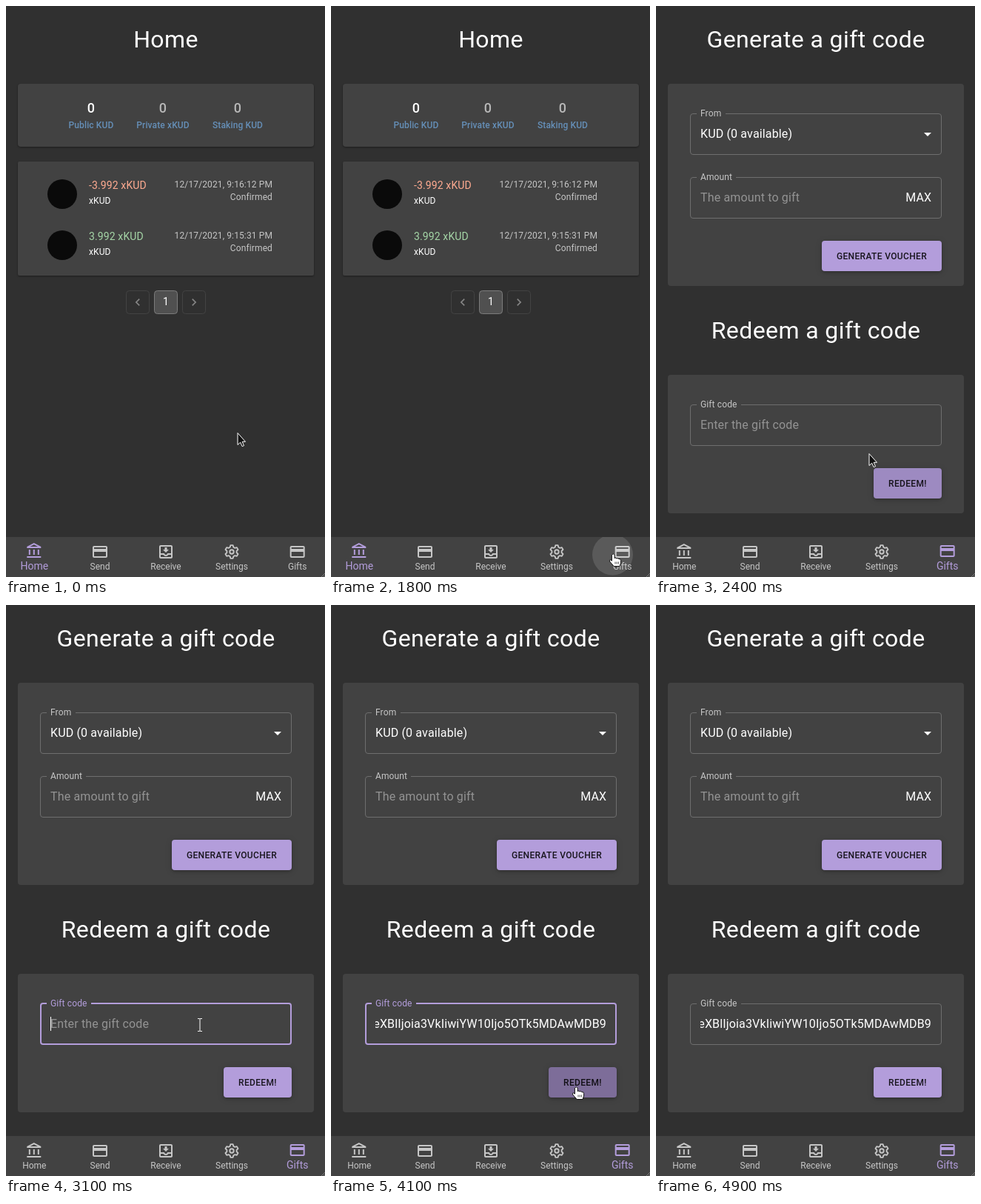
Write an HTML page that moves like this. It is 431 px wide and 771 px high and loops after 8000 ms.

```html
<!DOCTYPE html>
<html lang="en">
<head>
<meta charset="utf-8">
<title>Wallet gift code</title>
<style>
html, body { margin: 0; height: 100%; overflow: hidden; background: #303030; }
svg { display: block; width: 100vw; height: 100vh; font-family: Roboto, sans-serif; }
.card { filter: drop-shadow(0 1px 1px rgba(0, 0, 0, .4)); }
.button { filter: drop-shadow(0 2px 2px rgba(0, 0, 0, .2)) drop-shadow(0 1px 4px rgba(0, 0, 0, .12)); }
</style>
</head>
<body>
<svg id="stage" viewBox="0 0 431 771"></svg>
<script>
const LOOP = 8000, STEP = 100;
const PURPLE = '#b39ddb', PURPLE_DARK = '#7d6d99', SOFT = '#c6c6c6', PANEL = '#424242', LINE = '#6e6e6e';
const GIFT_CODE = 'eyJ0eXBlIjoia3VkIiwiYW10Ijo5OTk5MDAwMDB9';

// Linear interpolation through [time, ...values] keys
function track(t, keys) {
  const next = keys.findIndex(key => key[0] > t);
  if (next === 0) return keys[0].slice(1);
  if (next < 0) return keys[keys.length - 1].slice(1);
  const a = keys[next - 1], b = keys[next], k = (t - a[0]) / (b[0] - a[0]);
  return a.slice(1).map((v, i) => v + (b[i + 1] - v) * k);
}
const mix = (from, to, k) => `color-mix(in srgb, ${to} ${k * 100}%, ${from})`;

function text(x, y, str, size, fill = '#fff', { anchor = 'start', weight = 400, spacing = .12, extra = '' } = {}) {
  return `<text x="${x}" y="${y}" font-size="${size}" fill="${fill}" text-anchor="${anchor}"
    font-weight="${weight}" letter-spacing="${spacing}" ${extra}>${str}</text>`;
}
const rect = (x, y, w, h, r, fill, extra = '') =>
  `<rect x="${x}" y="${y}" width="${w}" height="${h}" rx="${r}" fill="${fill}" ${extra}/>`;
const icon = (x, y, size, d, fill) =>
  `<path transform="translate(${x} ${y}) scale(${size / 24})" d="${d}" fill="${fill}"/>`;
const title = (y, str) => text(216, y, str, 32, '#fff', { anchor: 'middle', spacing: .4 });

// Home page

function balance(x, label, fill) {
  const opts = { anchor: 'middle', weight: 500 };
  return text(x, 144, '0', 18, fill, opts) + text(x, 165, label, 12, '#658fb8', opts);
}

function transaction(y, amount, fill, date) {
  const end = { anchor: 'end' };
  return `<circle cx="76" cy="${y}" r="20" fill="#0a0a0a"/>`
    + text(112, y - 7, amount, 14, fill) + text(112, y + 13, 'xKUD', 12)
    + text(360, y - 9, date, 12, SOFT, end) + text(360, y + 8, 'Confirmed', 12, SOFT, end);
}

function pageButton(x, fill, stroke) {
  return rect(x + .5, 384.5, 31, 31, 4, fill, `stroke="${stroke}"`);
}

const homePage = title(56, 'Home')
  + rect(16, 105, 400, 85, 4, PANEL, 'class="card"')
  + balance(115, 'Public KUD', '#fff') + balance(212, 'Private xKUD', '#b8b8b8') + balance(313, 'Staking KUD', '#b8b8b8')
  + rect(16, 210, 400, 154, 2, PANEL, 'class="card"')
  + transaction(254, '-3.992 xKUD', '#ffab91', '12/17/2021, 9:16:12 PM')
  + transaction(323, '3.992 xKUD', '#a5d6a7', '12/17/2021, 9:15:31 PM')
  + pageButton(162, 'none', '#434343') + pageButton(200, '#505050', '#7c7c7c') + pageButton(238, 'none', '#434343')
  + icon(168, 390, 20, 'M15.4 7.4L14 6l-6 6 6 6 1.4-1.4L10.8 12z', '#858585')
  + icon(244, 390, 20, 'M10 6L8.6 7.4 13.2 12l-4.6 4.6L10 18l6-6z', '#858585')
  + text(216, 404, '1', 14, '#fff', { anchor: 'middle' });

// Gift page

// The top edge moves up when the outline gets thicker
function field(y, label, notchEnd, color = LINE, width = 1, labelColor = SOFT) {
  const i = width / 2, r = 4 - i, top = y + 1 - i;
  return `<path d="M${notchEnd} ${top}H382a${r} ${r} 0 0 1 ${r} ${r}V${y + 52}
    a${r} ${r} 0 0 1 ${-r} ${r}H50a${r} ${r} 0 0 1 ${-r} ${-r}V${top + r}
    a${r} ${r} 0 0 1 ${r} ${-r}H55" fill="none" stroke="${color}" stroke-width="${width}"/>`
    + text(60, y + 4, label, 12, labelColor);
}
const inputText = (y, str, fill) => text(60, y, str, 16, fill, { spacing: .15 });

function button(x, y, w, label, fill, overlay = '') {
  return rect(x, y, w, 41, 4, fill, 'class="button"') + overlay
    + text(x + w / 2, y + 25, label, 12, 'rgba(0,0,0,.87)', { anchor: 'middle', weight: 500, spacing: .34 });
}

const giftPage = title(56, 'Generate a gift code')
  + rect(16, 105, 400, 273, 4, PANEL)
  + field(145, 'From', 94) + inputText(178, 'KUD (0 available)', '#fff')
  + '<path d="M362 171h10l-5 5z" fill="#fff"/>'
  + field(231, 'Amount', 108) + inputText(264, 'The amount to gift', '#939393')
  + text(372.3, 264, 'MAX', 16, '#fff', { anchor: 'end', spacing: .15 })
  + button(224, 317, 162, 'GENERATE VOUCHER', PURPLE)
  + title(449, 'Redeem a gift code')
  + rect(16, 498, 400, 187, 4, PANEL);

function ripple(x, y, r, fullRadius, color, strength, clip) {
  const opacity = strength * (.1 + .2 * r / fullRadius);
  return `<circle cx="${x}" cy="${y}" r="${r}" fill="${color}" opacity="${opacity}" clip-path="url(#${clip})"/>`;
}

function redeemForm(t) {
  const [focus] = track(t, [[2800, 0], [3000, .8], [3100, 1], [4200, 1], [4400, 0]]);
  const hovered = t >= 2700 && t < 3400;
  const color = mix(hovered && !focus ? '#fff' : LINE, PURPLE, focus);
  let out = field(538, 'Gift code', 115, color, focus > .5 ? 2 : 1, mix(SOFT, PURPLE, focus));

  const pasted = t >= 3300;
  out += pasted
    ? text(372, 571, GIFT_CODE, 16, '#fff', { anchor: 'end', spacing: .15, extra: 'clip-path="url(#inputClip)"' })
    : inputText(571, 'Enter the gift code', '#939393');
  if (t >= 2900 && t < 3900) out += rect(pasted ? 372 : 60, 556, 1, 19, 0, '#fff');

  const [hover] = track(t, [[2100, 0], [2300, .7], [2400, .4], [2600, .4], [2700, 0],
    [3800, 0], [4100, 1], [4600, 1], [4900, 0]]);
  let press = '';
  if (t >= 4300 && t < 4900) {
    const [r] = track(t, [[4200, 0], [4300, 8], [4400, 27], [4500, 46], [4700, 62]]);
    const [fade] = track(t, [[4500, 1], [4900, 0]]);
    press = ripple(331, 651, r, 62, '#000', .87 * fade, 'redeemClip');
  }
  return out + button(294, 624, 92, 'REDEEM!', mix(PURPLE, PURPLE_DARK, hover), press);
}

// Bottom navigation

const CARD_ICON = 'M20 4H4c-1.1 0-2 .9-2 2v12c0 1.1.9 2 2 2h16c1.1 0 2-.9 2-2V6c0-1.1-.9-2-2-2zm0 14H4v-6h16v6zm0-10H4V6h16v2z';
const BANK_ICON = 'M6.5 10h-2v7h2zm6 0h-2v7h2zM21 19H2v2h19zm-2.5-9h-2v7h2zm-7-6.74L16.71 6H6.29zm0-2.26L2 6v2h19V6z';
const INBOX_ICON = 'M16 9h-2.5V6h-3v3H8l4 4zM19 3H5c-1.1 0-2 .9-2 2v14c0 1.1.9 2 2 2h14c1.1 0 2-.9 2-2V5c0-1.1-.9-2-2-2z'
  + 'm0 16H5v-3h3.6c.7 1.2 2 2 3.4 2s2.7-.8 3.4-2H19zm0-5h-5c0 1.1-.9 2-2 2s-2-.9-2-2H5V5h14z';

function gear(x, y, color) {
  const points = [];
  for (let tooth = 0; tooth < 6; tooth++)
    for (const [r, deg] of [[6.7, -20], [9, -10.5], [9, 10.5], [6.7, 20]]) {
      const a = (tooth * 60 + deg) * Math.PI / 180;
      points.push([x + r * Math.sin(a), y - r * Math.cos(a)].map(v => v.toFixed(2)));
    }
  return `<g fill="none" stroke="${color}" stroke-width="1.9" stroke-linejoin="round">
    <polygon points="${points.join(' ')}"/><circle cx="${x}" cy="${y}" r="2.7"/></g>`;
}

function navItem(x, label, path, active = 0) {
  const color = mix(SOFT, PURPLE, active);
  return (path ? icon(x - 12, 725 - active, 24, path, color) : gear(x, 737, color))
    + text(x, 761, label, 12 + 2 * active, color, { anchor: 'middle', spacing: 0 });
}

function navigation(t) {
  const [gifts] = track(t, [[1900, 0], [2200, 1]]);
  let out = rect(0, 717, 431, 54, 0, PANEL)
    + navItem(38.3, 'Home', BANK_ICON, 1 - gifts) + navItem(127, 'Send', CARD_ICON)
    + navItem(216, 'Receive', INBOX_ICON) + navItem(305, 'Settings', '')
    + navItem(393.7, 'Gifts', CARD_ICON, gifts)
    + '<path d="M426 771l5-5M429 771l2-2" stroke="#8c8c8c" stroke-width=".8"/>';
  if (t >= 1800 && t < 2400) {
    const [r] = track(t, [[1800, 27.5], [1900, 50], [2000, 60], [2100, 66]]);
    const [fade] = track(t, [[1900, 1], [2400, 0]]);
    out += ripple(380.5, 741, r, 66, '#fff', .7 * fade, 'navClip');
  }
  return out;
}

// Pointer

const POINTER_PATH = [
  [500, 313, 576], [700, 316, 569], [900, 316, 569], [1200, 352, 665], [1500, 381, 740],
  [1900, 381, 740], [2400, 288, 604], [2600, 288, 604], [2700, 262, 567], [3200, 262, 567],
  [3700, 315, 669], [3800, 320.5, 661], [4100, 331, 651], [4500, 331, 651], [4800, 345, 710]];
const ARROW = '<path d="M0 .5V16.5L3.7 13.2 6.1 18.6 8.5 17.6 6.2 12.3H10.5z" fill="#111" stroke="#fff"/>';
const HAND = `<path d="M-1.6 1.2Q.3-1.6 2.2 1.2V5.6Q4 4.4 5 6Q7 5 7.9 6.7Q10.6 6 10.6 8.6V12L9 16.5H1.2
  L-4.4 10Q-5.2 7.6-3.2 7.8L-1.6 9.2Z" fill="#fff" stroke="#111"/>
  <path d="M3 10.5v3M5.2 10.5v3M7.4 10.5v3" stroke="#222" stroke-width=".8"/>`;
const IBEAM = '<path d="M-3-8.5h2.5L0-8l.5-.5H3M0-8V8M-3 8.5h2.5L0 8l.5.5H3" fill="none" stroke="#fff"/>';

function pointer(t) {
  if (t >= 4900) return '';
  const [x, y] = track(t, POINTER_PATH);
  const onGifts = t >= 1900;
  const inside = (x0, y0, x1, y1) => x >= x0 && x <= x1 && y >= y0 && y <= y1;
  const shape = y > 717 || onGifts && inside(294, 624, 386, 665) ? HAND
    : onGifts && inside(46, 538, 386, 594) ? IBEAM : ARROW;
  return `<g transform="translate(${x} ${y})">${shape}</g>`;
}

const clip = (id, ...box) => `<clipPath id="${id}">${rect(...box, '#000')}</clipPath>`;
const defs = clip('inputClip', 60, 540, 313, 50, 0) + clip('redeemClip', 294, 624, 92, 41, 4)
  + clip('navClip', 349, 717, 82, 54, 0);

const scene = t => defs + rect(0, 0, 431, 771, 0, '#303030')
  + (t < 1900 ? homePage : giftPage + redeemForm(t)) + navigation(t) + pointer(t);

const stage = document.getElementById('stage');
let shown = -1;
function tick() {
  const t = Math.floor(performance.now() % LOOP / STEP) * STEP;
  if (t !== shown) stage.innerHTML = scene(shown = t);
  requestAnimationFrame(tick);
}
tick();
</script>
</body>
</html>
```
